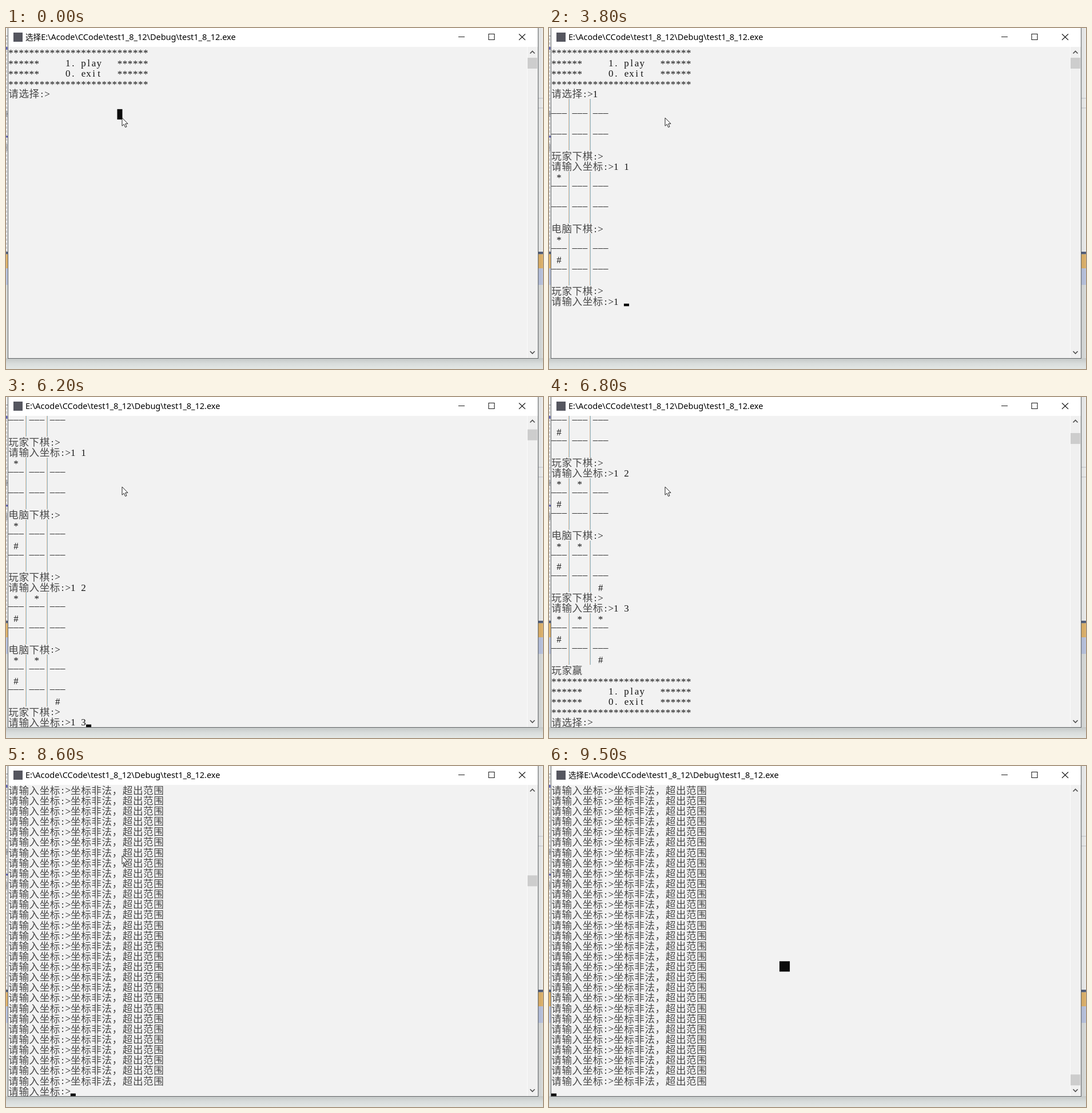
These frames come from a looping animation (939 by 596 pixels, 9600 ms). An HTML page:

```html
<!DOCTYPE html>
<html lang="zh-CN">
<head>
<meta charset="utf-8">
<title>Console</title>
<style>
  html, body { margin: 0; width: 100%; height: 100%; overflow: hidden; background: #dfe3e2; }
  svg { display: block; width: 939px; height: 596px; }
  .title { font: 14.47px "Noto Sans", "Open Sans", sans-serif; fill: #000; }
  .title .cjk { font: 13.6px "Noto Sans CJK SC", sans-serif; }
  .rows { text-anchor: middle; }
  .rows rect { shape-rendering: crispEdges; }
  .han { font: 300 17.6px "Noto Sans CJK SC", "Noto Sans CJK", sans-serif; fill: #484848; }
  .latin { font: 17px "Liberation Serif", "Noto Serif", serif; fill: #151515; }
  .icon { fill: none; stroke: #1c1c1c; stroke-width: 1.1; }
  .arrow { fill: none; stroke: #505050; stroke-width: 1.7; }
</style>
</head>
<body>
<svg viewBox="0 0 939 596" xmlns="http://www.w3.org/2000/svg">
  <defs>
    <linearGradient id="under" x2="0" y2="1">
      <stop offset="0" stop-color="#c3c7c6"/><stop offset=".5" stop-color="#d8dcdb"/><stop offset="1" stop-color="#e3e7e5"/>
    </linearGradient>
    <linearGradient id="side">
      <stop offset="0" stop-color="#000" stop-opacity=".07"/><stop offset="1" stop-color="#000" stop-opacity="0"/>
    </linearGradient>
    <clipPath id="client"><rect x="0" y="33" width="911" height="544"/></clipPath>
  </defs>

  <!-- window behind -->
  <rect width="939" height="391" fill="#eceded"/>
  <rect y="122" width="939" height="1.5" fill="#cfd1d6"/>
  <rect y="139" width="939" height="1.5" fill="#cfd1d6"/>
  <rect y="391" width="939" height="4.5" fill="#53607c"/>
  <rect y="395.5" width="939" height="24.5" fill="#dfb36c"/>
  <rect y="420" width="939" height="29" fill="#bac4df"/>
  <rect y="449" width="939" height="147" fill="#d9dcdb"/>
  <rect y="577" width="939" height="19" fill="url(#under)"/>
  <rect x="931" width="8" height="577" fill="url(#side)"/>
  <path d="M1 18V391" stroke="#a5a7ad" stroke-dasharray="4 3"/>
  <path d="M0 14h3M1.500 145v11M0 150h3M1.500 203v12" stroke="#777a84"/>
  <path d="M0 190h3M1 33v5" stroke="#5b5fb0" stroke-width="3"/>

  <!-- console window -->
  <rect x="3" y="-2" width="928" height="580" fill="#5f6365"/>
  <rect x="4" width="926" height="33" fill="#fff"/>
  <rect x="4" y="33" width="926" height="544" fill="#f2f2f2"/>
  <rect x="911" y="33" width="19" height="544" fill="#f0f0f0"/>
  <rect x="911" y="33" width="1" height="544" fill="#fbfbfb"/>
  <rect x="13" y="8" width="16" height="16" fill="#55565f"/>
  <text class="title" x="34" y="21"><tspan class="cjk" id="mode"></tspan><tspan>E:\Acode\CCode\test1_8_12\Debug\test1_8_12.exe</tspan></text>
  <path class="icon" d="M791 15.500h11M844 10.500h10v10h-10zM897 10.500l11 10.500M908 10.500l-11 10.500"/>
  <path class="arrow" d="M916.500 44.500l4-4 4 4M916.500 565l4 4 4-4"/>
  <rect id="thumb" x="912" width="17" height="19" fill="#cdcdcd"/>

  <g clip-path="url(#client)">
    <g id="rows" class="rows"></g>
    <rect id="caret" width="9.1" height="4.500" fill="#0a0a0a"/>
    <rect id="pick" height="18.1" fill="#0c0c0c"/>
  </g>
  <path id="mouse" d="M0 0V14.200L3.300 11.200 5.600 16.500 8 15.500 5.700 10.300H10z" fill="#fff" stroke="#222" stroke-width="1"/>
</svg>
<script>
const LOOP = 9600, LEFT = 4, TOP = 33, CW = 9.067, RH = 544 / 30, ROWS = 30;
const FLOOD = 8600, STOP = 9500;
const $ = id => document.getElementById(id);
const set = (el, attrs) => { for (const k in attrs) el.setAttribute(k, attrs[k]); };
const colX = c => LEFT + c * CW;
const rowY = r => TOP + r * RH;
const wide = ch => ch.charCodeAt(0) > 0x2e80;
const cells = s => [...s].reduce((n, ch) => n + (wide(ch) ? 2 : 1), 0);

const stars = '*'.repeat(27);
const menu = [stars, '******     1. play   ******', '******     0. exit   ******', stars, '请选择:>'].join('\n');
const ask = '请输入坐标:>', player = '玩家下棋:>\n' + ask, computer = '电脑下棋:>\n';
const bad = ask + '坐标非法，超出范围';
// nine marks, row by row
const board = marks => [0, 3, 6]
  .map(i => [...marks.slice(i, i + 3)].map(m => ` ${m} `).join('|') + '\n')
  .join('---|---|---\n');

const output = [
  [0, menu],
  [1100, '1'],
  [1300, '\n' + board('         ') + player],
  [2300, '1'], [2500, ' '], [2700, '1'],
  [3000, '\n' + board('*        ') + computer + board('*  #     ') + player],
  [3300, '1'], [3500, ' '], [4200, '2'],
  [4500, '\n' + board('** #     ') + computer + board('** #    #') + player],
  [5600, '1'], [5800, ' '], [6200, '3'],
  [6600, '\n' + board('***#    #') + '玩家赢\n' + menu],
  [7700, 'a'], [7800, 'a'], [7900, 'a']
];
const blinks = [100, 300, 500, 800, 1000, 1300, 1500, 1800, 2100, 2300, 2600, 2900, 3100, 3400,
  3800, 4000, 4200, 4500, 4800, 5000, 5100, 5400, 5600, 5900, 6200, 6400, 6600, 6800, 7000, 7300,
  7500, 7700, 7900, 8200, 8400];

// baseline inside a row, by glyph
const drop = ch => ch === '*' ? 16.4 : ch === '-' ? 11 : 15.4;

function textTag(kind, glyphs) {
  if (!glyphs.length) return '';
  const list = k => glyphs.map(g => g[k].toFixed(2)).join(' ');
  const s = glyphs.map(g => g.ch).join('').replace(/>/g, '&gt;');
  return `<text class="${kind}" x="${list('x')}" y="${list('y')}">${s}</text>`;
}

function rowMarkup(line, r) {
  const han = [], latin = [], y = rowY(r);
  const bar = (x, fill) => `<rect x="${x}" y="${y}" width="1" height="${RH}" fill="${fill}"/>`;
  let col = 0, bars = '';
  for (const ch of line) {
    const w = wide(ch) ? 2 : 1, x = colX(col + w / 2);
    if (w === 2) han.push({ ch, x, y: y + 15.8 });
    else if (ch === '|') bars += bar(Math.floor(x) - 1, '#e3bfa0') + bar(Math.floor(x), '#8fbfd6');
    else if (ch !== ' ') latin.push({ ch: ch === '-' ? '–' : ch, x, y: y + drop(ch) });
    col += w;
  }
  return bars + textTag('han', han) + textTag('latin', latin);
}

function stateAt(t) {
  const s = { pick: null, mouse: [203, 157], caret: blinks.filter(b => b <= t).length % 2 === 1 };
  if (t < FLOOD) {
    const lines = output.filter(o => o[0] <= t).map(o => o[1]).join('').split('\n');
    s.scroll = Math.max(0, lines.length - ROWS);
    s.lines = lines.slice(s.scroll);
    if (t < 100) s.pick = [21, 6, 1];
  } else {
    const done = t >= STOP;
    s.scroll = Math.min(840, 240 + (t - FLOOD));
    s.lines = [...Array(ROWS - 1).fill(bad), done ? '' : ask];
    const k = Math.min(1, Math.max(0, (t - 9100) / 300));
    s.mouse = done ? null : [203 + 206 * k, 157 + 190 * k];
    if (done) s.pick = [44, 17, 2];
  }
  return s;
}

let shown = -1, drawn = '';
function frame() {
  const t = Math.floor(performance.now() % LOOP / 100) * 100;
  if (t !== shown) {
    shown = t;
    const s = stateAt(t), last = s.lines.length - 1;
    const html = s.lines.map(rowMarkup).join('');
    if (html !== drawn) $('rows').innerHTML = drawn = html;
    $('mode').textContent = s.pick ? '选择' : '';
    set($('thumb'), { y: 52 + s.scroll * .58 });
    set($('caret'), {
      x: colX(cells(s.lines[last])), y: rowY(last + 1) - 4.6,
      visibility: s.caret ? 'visible' : 'hidden'
    });
    const [c, r, w] = s.pick || [0, 0, 0];
    set($('pick'), { x: colX(c), y: rowY(r), width: w * CW });
    set($('mouse'), s.mouse
      ? { transform: `translate(${s.mouse})`, visibility: 'visible' }
      : { visibility: 'hidden' });
  }
  requestAnimationFrame(frame);
}
frame();
</script>
</body>
</html>
```
